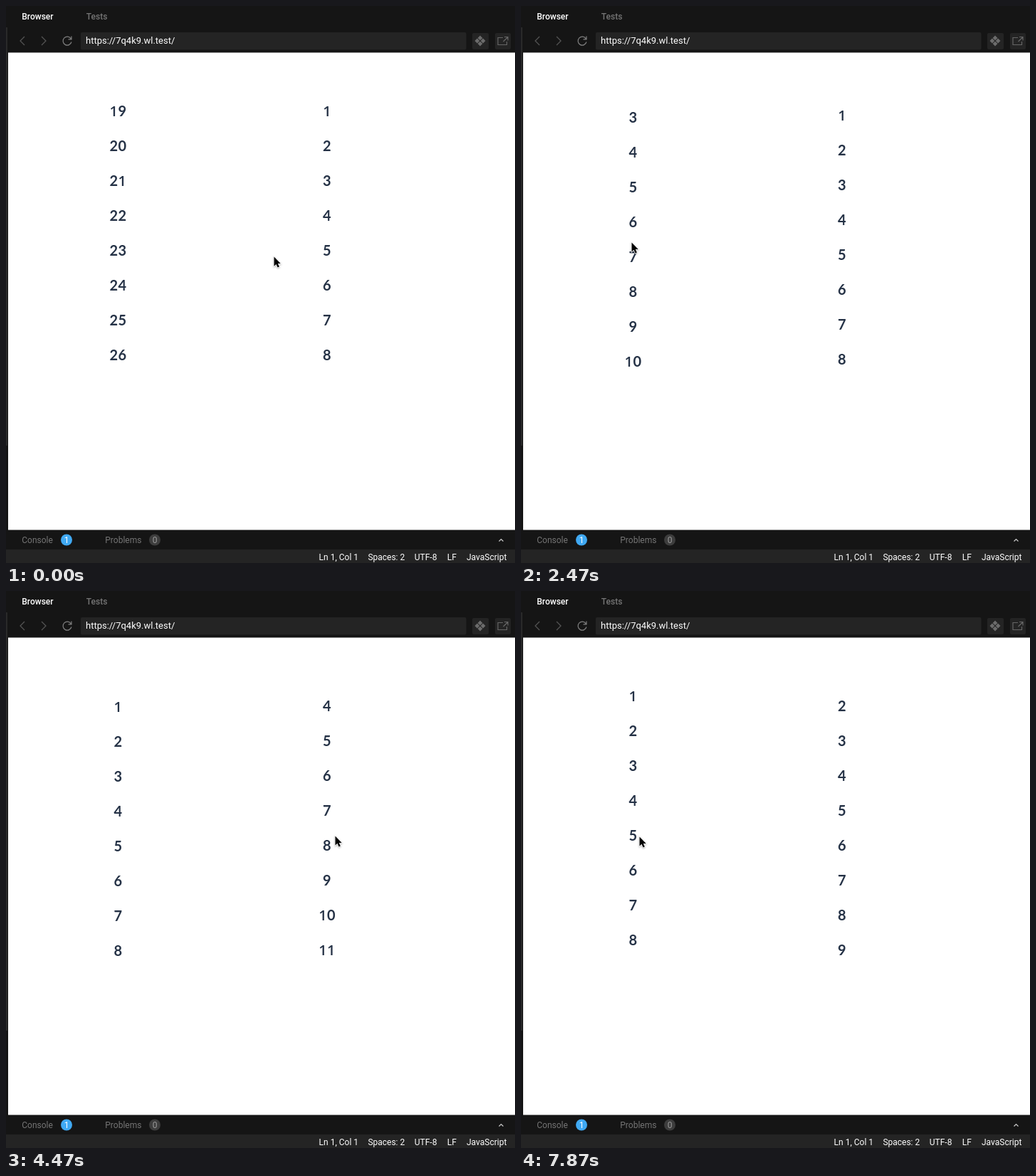
An HTML page for the animation above (8000 ms loop, 715 by 783 pixels).

```html
<!DOCTYPE html>
<html lang="en">
<head>
<meta charset="utf-8">
<title>Scrolling lists</title>
<style>
  html, body { margin: 0; width: 100%; height: 100%; overflow: hidden; background: #151515; }
  svg { display: block; width: 715px; height: 783px; font: 12px Roboto, sans-serif; }
  .medium { font-weight: 500; }
  .dim { fill: #757575; }
  .mid { text-anchor: middle; }
  .line { fill: none; stroke-width: 1.2; }
  .list { font: 700 20px Lato, sans-serif; letter-spacing: .4px; fill: #253246; text-anchor: middle; }
  .one { font-family: "Open Sans", sans-serif; font-weight: 600; }
  #cursor { filter: drop-shadow(0 1px 1px rgba(0, 0, 0, .3)); }
</style>
</head>
<body>
<svg viewBox="0 0 715 783">
  <defs>
    <clipPath id="view"><rect x="3" y="124" width="712" height="392"/></clipPath>
    <path id="diamond" d="M0 -3.4L3.4 0L0 3.4L-3.4 0Z"/>
  </defs>

  <rect width="715" height="783" fill="#151515"/>
  <rect y="30" width="2" height="588" fill="#292929"/>
  <text x="22.3" y="19" class="medium" fill="#fff">Browser</text>
  <text x="112.8" y="19" class="medium dim">Tests</text>

  <g class="line" stroke="#555">
    <path d="M26 43L20 49L26 55M50 43L56 49L50 55"/>
    <path d="M91.3 46.2A6 6 0 1 0 91.9 50.5M91.9 42.5V46.8H87.5" stroke="#808080"/>
  </g>
  <rect x="105" y="37" width="541.5" height="24.5" rx="2" fill="#242424"/>
  <text x="112" y="53" font-size="13" fill="#fff">https://7q4k9.wl.test/</text>
  <g fill="#242424">
    <rect x="655" y="38" width="23" height="23" rx="2"/>
    <rect x="687" y="38" width="22" height="23" rx="2"/>
  </g>
  <g fill="#6c6c6c">
    <use href="#diamond" x="666" y="44.9"/>
    <use href="#diamond" x="666" y="53.1"/>
    <use href="#diamond" x="661.9" y="49"/>
    <use href="#diamond" x="670.1" y="49"/>
  </g>
  <path class="line" stroke="#666" d="M698 44.5H691V54.5H703.5V50M700 43.5H705V48.5M705 43.5L698.5 50"/>

  <rect x="3" y="65.5" width="712" height="671" fill="#fff"/>
  <g clip-path="url(#view)">
    <g id="left" class="list"></g>
    <g id="right" class="list"></g>
  </g>

  <text x="22.3" y="755" class="dim">Console</text>
  <circle cx="85" cy="750.5" r="8" fill="#40a9f3"/>
  <text x="85" y="755" class="mid" fill="#fff">1</text>
  <text x="139.3" y="755" class="dim">Problems</text>
  <circle cx="209" cy="750.5" r="8" fill="#3d3d3d"/>
  <text x="209" y="755" class="mid" fill="#999">0</text>
  <path class="line" stroke="#ccc" d="M692.5 752.5L695.5 749.5L698.5 752.5"/>

  <rect y="764" width="715" height="19" fill="#242424"/>
  <g fill="#fff">
    <text x="439.6" y="779">Ln 1, Col 1</text>
    <text x="508.4" y="779">Spaces: 2</text>
    <text x="573.8" y="779">UTF-8</text>
    <text x="619.7" y="779">LF</text>
    <text x="647" y="779">JavaScript</text>
  </g>

  <g id="cursor">
    <path transform="translate(.5 .5) scale(.92)" d="M0 0V14.2L3.2 11.2L5.5 16.3L8 15.2L5.8 10.2H10Z" stroke="#fff" stroke-width="1.6" paint-order="stroke"/>
  </g>
</svg>

<script>
  const LOOP = 8000, ROW = 49, COUNT = 30, VISIBLE = 8;
  const END = (COUNT - VISIBLE) * ROW;
  const TRIP = 250;
  const $ = id => document.getElementById(id);

  // Each fling: [start ms, duration, offset reached].
  const leftFlings = [[-797, 882, END], [547, 600, 0], [2218, 882, END], [3641, 600, 0]];
  const rightFlings = [[150, 500, 212], [1300, 400, 45], [2209, 100, 0], [2900, 600, 322], [4102, 1228, 35.5]];

  // Each pointer trip: [start ms, x, y].
  const home = [156, 338];
  const trips = [
    [-153, 484, 359], [430, 158, 338], [1180, 447, 344], [2120, 155, 332], [2620, 447, 354],
    [3302, 158, 342], [3900, 462, 344], [5080, 449, 343.5], [7300, 151, 338], [7620, 166, 345]
  ];

  // A fling speeds into either end and rubber-bands there, or coasts to rest in between.
  function offset(flings, t) {
    let from = 0, pos = 0;
    for (const [at, dur, to] of flings) {
      if (t < at) break;
      const u = (t - at) / dur, dist = to - from;
      if (to > 0 && to < END) {
        pos = from + dist * (1 - (1 - Math.min(u, 1)) ** 3);
      } else if (u < 1) {
        pos = from + dist * u * u;
      } else {
        const speed = 2 * dist / dur, since = t - at - dur;
        pos = to + .31 * speed * since * Math.exp(-since / 80);
      }
      from = to;
    }
    return pos;
  }

  function pointer(t) {
    let [x, y] = home;
    for (const [at, toX, toY] of trips) {
      if (t < at) break;
      const u = Math.min((t - at) / TRIP, 1), k = u * u * (3 - 2 * u);
      x += (toX - x) * k;
      y += (toY - y) * k;
    }
    return [x, y];
  }

  function fill(list, x) {
    for (let n = 1; n <= COUNT; n++) {
      const digits = String(n).replace(/1/g, '<tspan class="one">1</tspan>');
      list.innerHTML += `<text x="${x}" y="${155.2 + (n - 1) * ROW}">${digits}</text>`;
    }
  }

  const move = (el, x, y) => el.setAttribute('transform', `translate(${x} ${y})`);
  const left = $('left'), right = $('right'), cursor = $('cursor');
  fill(left, 157.5);
  fill(right, 451.1);

  const start = performance.now();
  function draw() {
    const t = (performance.now() - start) % LOOP;
    move(left, 0, -offset(leftFlings, t));
    move(right, 0, -offset(rightFlings, t));
    move(cursor, ...pointer(t));
    requestAnimationFrame(draw);
  }
  draw();
</script>
</body>
</html>
```
